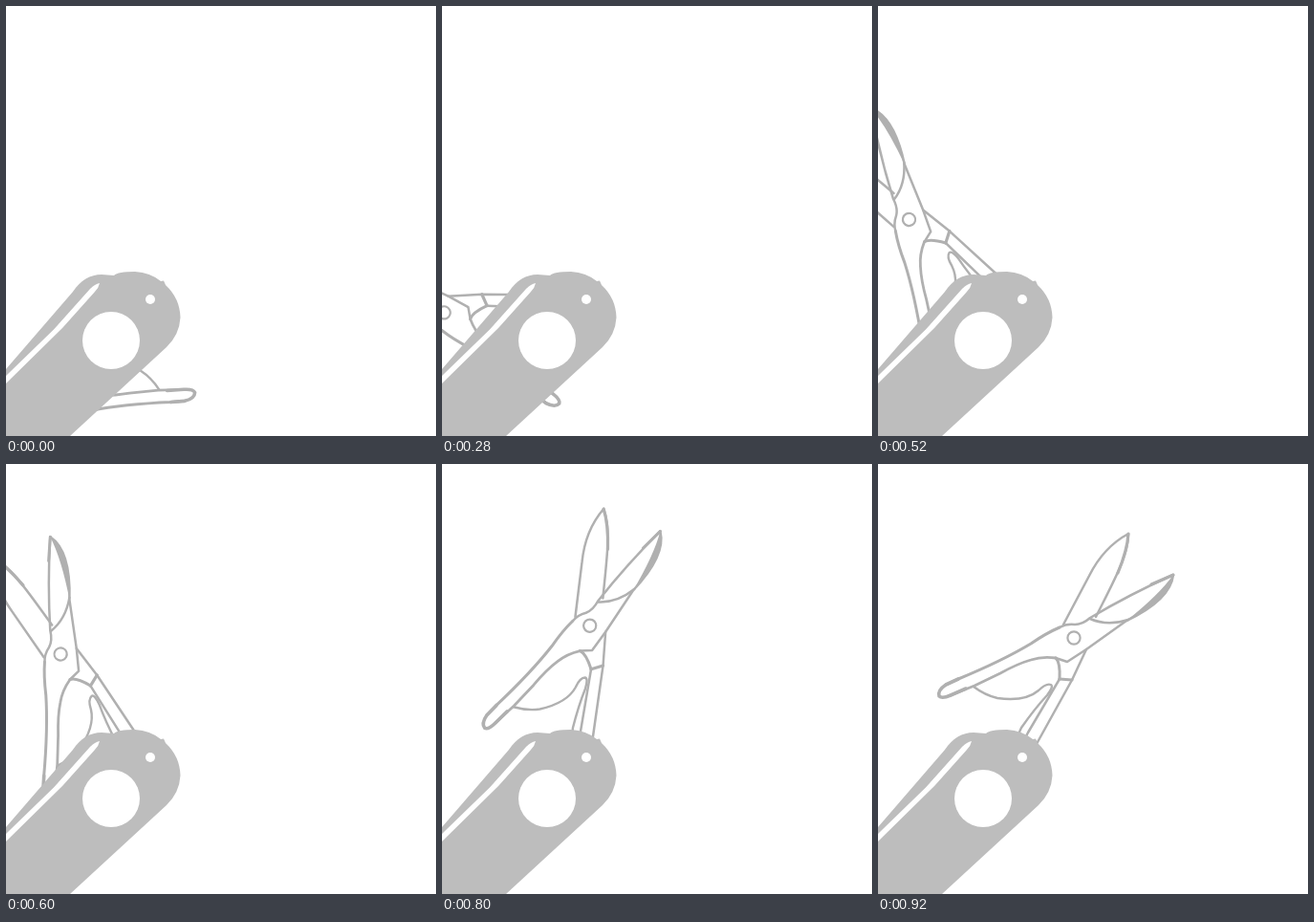
Recreate the animation shown at these times as an HTML page with a canvas. Size 450 by 450 pixels, loop 960 ms.

```html
<!DOCTYPE html>
<html lang="en">
<head>
<meta charset="utf-8">
<title>Pocket knife</title>
<style>
  html, body { margin: 0; width: 100%; height: 100%; overflow: hidden; background: #fff; }
  canvas { display: block; }
</style>
</head>
<body>
<canvas id="stage" width="450" height="450"></canvas>
<script>
const ctx = document.getElementById('stage').getContext('2d');

const LOOP = 960;
const STEP_MS = 40;
const LAST_STEP = 23;
const STEP_ANGLE = 6.96 * Math.PI / 180;
const PIVOT = { x: 145, y: 312 };
const BODY = '#bdbdbd';
const LINE = '#b0b0b0';

// Scissors in their fully opened pose.
const outlines = [
  ['M194 168 L221 117 Q236 87 262 73 C262 95 249 118 228 160', 2.5],     // back blade
  ['M262 73 Q261 90 251 114', 3.2],
  ['M190 171 Q197 167 206 168 Q214 168 222 161 Q264 136 309 116', 2.5],  // front blade
  ['M222 162 Q240 170 262 163', 2.5],
  ['M309 116 Q306 142 260 164 L218 194 L198 207 L186 203', 2.5],
  ['M286 126 L309 116', 3],
  ['M190 171 Q176 177 160 188 Q130 206 84 225 L71 231', 3],              // handle
  ['M76 242 L101 232 L128 219 Q146 209 160 205 Q172 201 186 203', 2.8],
  ['M84 225 L71 231 Q62 237 64 243 Q67 246 76 242 L92 235', 3.6],
  ['M186 203 Q191 208 190 225', 3],
  ['M100 233 Q112 242 125 245 Q154 249 168 237 Q176 229 181 231 Q184 233 177 242 Q164 256 150 276 L141 296', 2.4], // spring
  ['M190 225 L203 226', 3.2],                                           // lever
  ['M218 194 L203 226 L167 291 L160 304', 2.5],
  ['M190 225 L157 281 L147 300', 2.5]
].map(([d, width]) => ({ path: new Path2D(d), width }));

const bevel = new Path2D('M309 116 Q306 142 260 164 Q294 137 309 116 Z');
const body = new Path2D(
  'M0 380 L70 299 Q82 281 100 281 L113 282 Q117 278 135 278 Q151 279 162 288 ' +
  'L165 287.5 L167 292 Q182 306 182.5 326 Q181.5 344 168 357 L67 450 L0 450 Z');
const highlight = new Path2D('M98 290 Q93 291 88 296 L50 338.5 L0 387 L0 395 L59 337 L93 299 Q97 295 98 290 Z');

function disc(x, y, r) {
  ctx.beginPath();
  ctx.arc(x, y, r, 0, Math.PI * 2);
}

function drawScissors(angle) {
  ctx.save();
  ctx.translate(PIVOT.x, PIVOT.y);
  ctx.rotate(angle);
  ctx.translate(-PIVOT.x, -PIVOT.y);
  ctx.strokeStyle = ctx.fillStyle = LINE;
  ctx.lineCap = ctx.lineJoin = 'round';
  for (const { path, width } of outlines) {
    ctx.lineWidth = width;
    ctx.stroke(path);
  }
  ctx.fill(bevel);
  ctx.lineWidth = 2.2;
  disc(205, 182, 6.6);
  ctx.stroke();
  ctx.restore();
}

function drawBody() {
  ctx.fillStyle = BODY;
  ctx.fill(body);
  ctx.fillStyle = '#fff';
  ctx.fill(highlight);
  disc(151, 307, 5);
  ctx.fill();
  disc(110, 350, 30);
  ctx.fill();
}

// The swing rests for one tick early on and catches up later.
function stepAt(time) {
  const tick = Math.floor((time % LOOP) / STEP_MS);
  return tick >= 4 && tick < 17 ? tick - 1 : tick;
}

function render(now) {
  ctx.fillStyle = '#fff';
  ctx.fillRect(0, 0, 450, 450);
  drawScissors((stepAt(now) - LAST_STEP) * STEP_ANGLE);
  drawBody();
}

let start;
function loop(now) {
  start ??= now;
  render(now - start);
  requestAnimationFrame(loop);
}

render(0);
requestAnimationFrame(loop);
</script>
</body>
</html>
```
